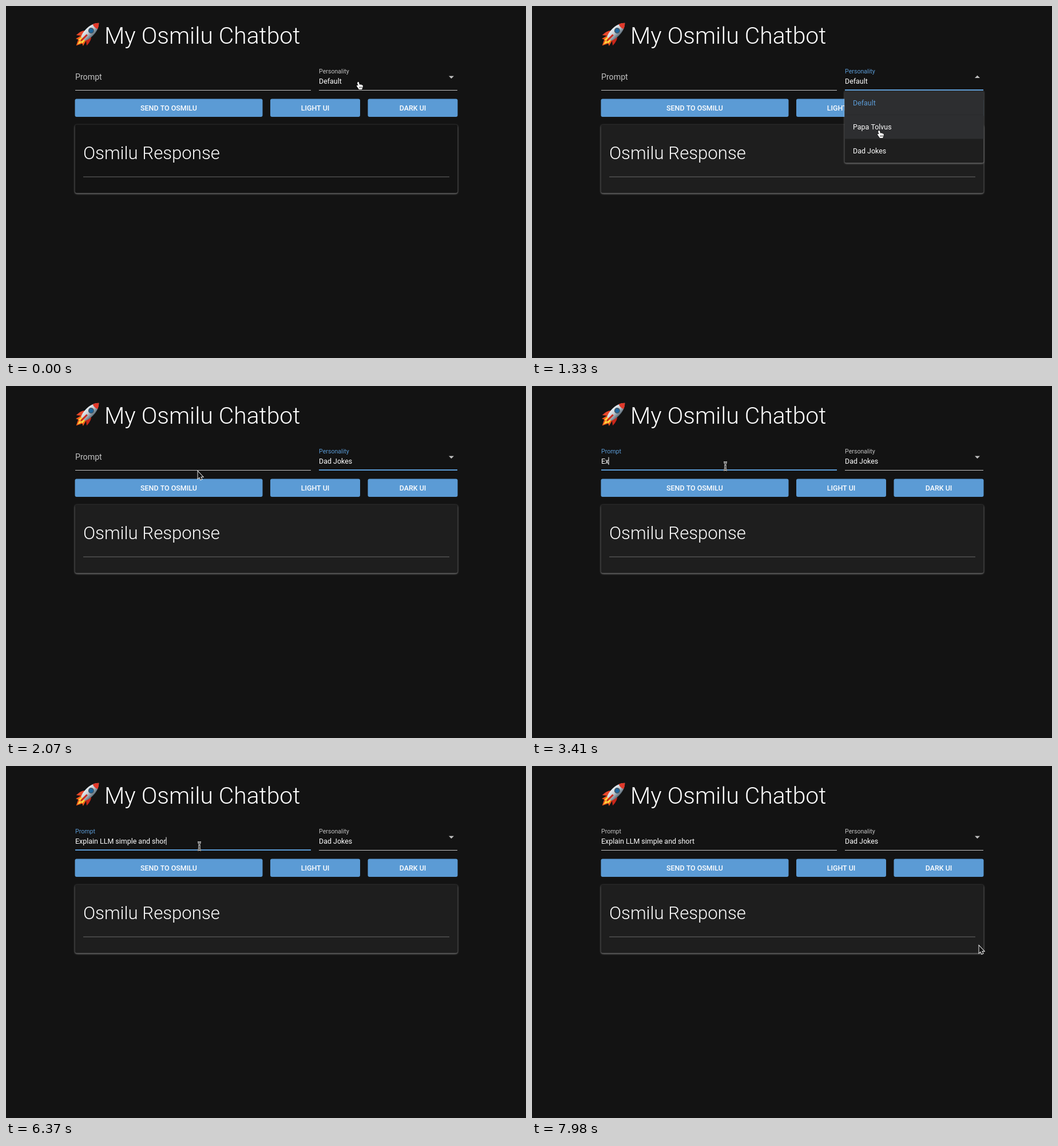
An HTML page with a canvas for the animation above (8000 ms loop, 909 by 616 pixels).

```html
<!DOCTYPE html>
<html lang="en">
<head>
<meta charset="utf-8">
<title>Chatbot</title>
<style>
  html, body { margin: 0; width: 100%; height: 100%; overflow: hidden; background: #131313; }
  canvas { display: block; }
</style>
</head>
<body>
<canvas id="stage" width="909" height="616"></canvas>
<script>
const ctx = document.getElementById('stage').getContext('2d');
const LOOP = 8000, TICK = 147.8;
const BLUE = '#5b9bd5', WHITE = '#fff', MUTED = '#c2c2c2';
const PROMPT = 'Explain LLM simple and short';
const OPTIONS = ['Default', 'Papa Tolvus', 'Dad Jokes'];

// [tick, characters typed]
const TYPED = [[22, 1], [23, 2], [25, 3], [26, 5], [27, 6], [28, 8], [30, 9], [31, 11], [32, 12],
  [34, 14], [35, 15], [36, 16], [37, 17], [38, 18], [39, 20], [40, 22], [41, 24], [42, 26], [43, 27], [45, 28]];

// [tick, x, y, shape]
const POINTER = [[0, 618, 139, 'hand'], [1, 617, 174, 'hand'], [4, 614, 180, 'hand'], [9, 609, 224, 'hand'],
  [11, 601, 254, 'hand'], [12, 590, 254, 'hand'], [13, 450, 200, 'arrow'], [14, 339, 157, 'arrow'],
  [16, 338, 140, 'beam'], [46, 338, 140, 'beam'], [47, 336, 157, 'arrow'], [48, 331, 176, 'hand'],
  [50, 331, 178, 'hand'], [51, 400, 208, 'arrow'], [53, 770, 335, 'arrow'], [54, 785, 322, 'arrow']];

const clamp = v => Math.max(0, Math.min(1, v));

function text(str, x, y, size, color = WHITE, weight = 400, align = 'left') {
  ctx.font = `${weight} ${size}px Roboto, sans-serif`;
  ctx.textAlign = align;
  ctx.fillStyle = color;
  ctx.fillText(str, x, y);
}

function rect(x, y, w, h, color) {
  ctx.fillStyle = color;
  ctx.fillRect(x, y, w, h);
}

function rounded(x, y, w, h, r, color) {
  ctx.fillStyle = color;
  ctx.beginPath();
  ctx.roundRect(x, y, w, h, r);
  ctx.fill();
}

function glow(alpha) {
  ctx.shadowColor = `rgba(255,255,255,${alpha})`;
  ctx.shadowBlur = 3;
  ctx.shadowOffsetY = 1;
}

function shape(path, fill, stroke, width = 1) {
  const p = new Path2D(path);
  if (stroke) {
    ctx.strokeStyle = stroke;
    ctx.lineWidth = width;
    ctx.stroke(p);
  }
  if (fill) {
    ctx.fillStyle = fill;
    ctx.fill(p);
  }
}

function at(x, y, draw) {
  ctx.save();
  ctx.translate(x, y);
  draw();
  ctx.restore();
}

function rocket() {
  at(142.5, 49.5, () => {
    ctx.rotate(Math.PI / 4);
    shape('M-6 9L-9 20L-5 18L0 28L5 18L9 20L6 9Z', '#f0581c');
    shape('M-4 9L-5 18L-2 17L0 25L3 17L5 18L4 9Z', '#ffd83d');
    shape('M-6 -3Q-13 2 -13 15L-5 9Z', '#e8472a');
    shape('M6 -3Q13 2 13 15L5 9Z', '#c9271b');
    const metal = ctx.createLinearGradient(-8, 0, 8, 0);
    metal.addColorStop(0, '#e8eef2');
    metal.addColorStop(0.45, '#c3ccd3');
    metal.addColorStop(1, '#60717e');
    shape('M0 -28C10 -18 10 0 5 11L-5 11C-10 0 -10 -18 0 -28Z', metal);
    shape('M0 -28Q4.5 -24 6 -19Q0 -16 -6 -19Q-4.5 -24 0 -28Z', '#e0392b');
    ctx.beginPath();
    ctx.arc(0, -9, 4.3, 0, 7);
    ctx.fillStyle = '#1d659c';
    ctx.fill();
    ctx.lineWidth = 1.5;
    ctx.strokeStyle = '#47545f';
    ctx.stroke();
    shape('M-1.5 1L1.5 1L1.5 15L0 18L-1.5 15Z', '#cf2a1e');
  });
}

function underline(x, w, focus) {
  rect(x, 147, w, 1, MUTED);
  if (focus > 0) rect(x + w * (1 - focus) / 2, 146, w * focus, 2, BLUE);
}

function button(label, x, w, color = BLUE) {
  rounded(x, 162.5, w, 31.5, 3, color);
  text(label, x + w / 2, 182.5, 12.45, WHITE, 500, 'center');
}

function promptField(k) {
  const float = clamp((k - 16) / 2), left = k >= 49;
  const focus = left ? clamp(1 - (k - 49) * 0.544) : float;
  const color = float > 0 && !left ? BLUE : MUTED;
  text('Prompt', 121, 129 - 11 * float, 14.2 - 3.55 * float, color);
  underline(121, 412, focus);
  const step = TYPED.filter(s => s[0] <= k).pop();
  const value = PROMPT.slice(0, step ? step[1] : 0);
  text(value, 121, 135.5, 12.45);
  if (k >= 19 && k < 49 && k !== 20 && k !== 21) {
    rect(Math.round(121 + ctx.measureText(value).width) - 0.5, 124.5, 1, 13.5, WHITE);
  }
}

function selectField(k) {
  const focused = k >= 4 && k < 17;
  text('Personality', 547, 118, 10.65, focused ? BLUE : MUTED);
  text(OPTIONS[k < 12 ? 0 : 2], 547, 135.5, 12.45);
  underline(547, 242, k >= 1 && k < 17 ? 1 : 0);
  shape(k >= 1 && k < 12 ? 'M774 126L778.5 121.5L783 126Z' : 'M774 122.5L778.5 127L783 122.5Z', MUTED);
}

function card(k) {
  const tone = Math.round(19 + 11 * clamp(k / 3));
  ctx.save();
  glow(0.55);
  rounded(120.5, 207.5, 669, 120, 4, `rgb(${tone},${tone},${tone})`);
  ctx.restore();
  text('Osmilu Response', 135, 267.5, 31.2, WHITE, 300);
  rect(135, 298.5, 640, 1, '#6a6a6a');
}

function menu(k, pointerY) {
  const alpha = k < 4 ? 0 : k < 12 ? 1 : [0.6, 0.2][k - 12] || 0;
  if (!alpha) return;
  ctx.save();
  ctx.globalAlpha = alpha;
  glow(0.5);
  rounded(546.5, 148.5, 243, 126, [0, 0, 3, 3], '#1e1e1e');
  ctx.shadowColor = 'transparent';
  const chosen = k < 12 ? 0 : 2, hover = Math.floor((pointerY - 156) / 42);
  OPTIONS.forEach((name, i) => {
    const y = 148.5 + i * 42;
    if (i === chosen || i === hover) rect(546.5, y, 243, 42, '#2d2e30');
    text(name, 561, y + 25.5, 12.45, i === chosen ? BLUE : WHITE);
  });
  ctx.restore();
}

function pointerAt(k) {
  const i = POINTER.findLastIndex(p => p[0] <= k);
  const a = POINTER[i], b = POINTER[i + 1] || a;
  // The pointer rests over the field before the list opens.
  const f = k < 4 || b === a ? 0 : (k - a[0]) / (b[0] - a[0]);
  return { x: a[1] + (b[1] - a[1]) * f, y: a[2] + (b[2] - a[2]) * f, kind: a[3] };
}

const cursors = {
  hand() {
    shape('M-3 -6Q-2 -7 -1 -5L0 -1L1 -2L2 -1L3 -2L4 0L5 -1L6 1L5 5L4 7H-1L-5 1Q-5 -1 -3 0L-2 1L-4 -4Z',
      '#fff', '#111', 1.2);
    shape('M0 2V5M2 2V5M4 2V5', null, '#222', 0.8);
  },
  arrow() {
    shape('M-3.5 -7.5V5L-0.8 2.5L1.2 7L3.3 6.1L1.3 1.8H5.2Z', '#111', '#fff', 1.8);
  },
  beam() {
    const path = 'M-3 -6.5Q0 -6.5 0 -4.5Q0 -6.5 3 -6.5M0 -4.5V5M-3 7Q0 7 0 5Q0 7 3 7M-2 1.5H2';
    shape(path, null, '#fff', 2.8);
    shape(path, null, '#111', 1);
  }
};

function draw(t) {
  const k = Math.floor((t + 4) / TICK);
  const pointer = pointerAt(k);
  rect(0, 0, 909, 616, '#131313');
  rocket();
  text('My Osmilu Chatbot', 172, 65.5, 40.8, WHITE, 300);
  promptField(k);
  selectField(k);
  const hovered = k >= 48 && k <= 50;
  button('SEND TO OSMILU', 120.5, 328, hovered ? (k === 50 ? '#76a9da' : '#69a3d8') : BLUE);
  button('LIGHT UI', 462, 157);
  button('DARK UI', 632.5, 157);
  card(k);
  menu(k, pointer.y);
  at(pointer.x, pointer.y, cursors[pointer.kind]);
}

const start = performance.now();
function loop() {
  draw((performance.now() - start) % LOOP);
  requestAnimationFrame(loop);
}
loop();
</script>
</body>
</html>
```
